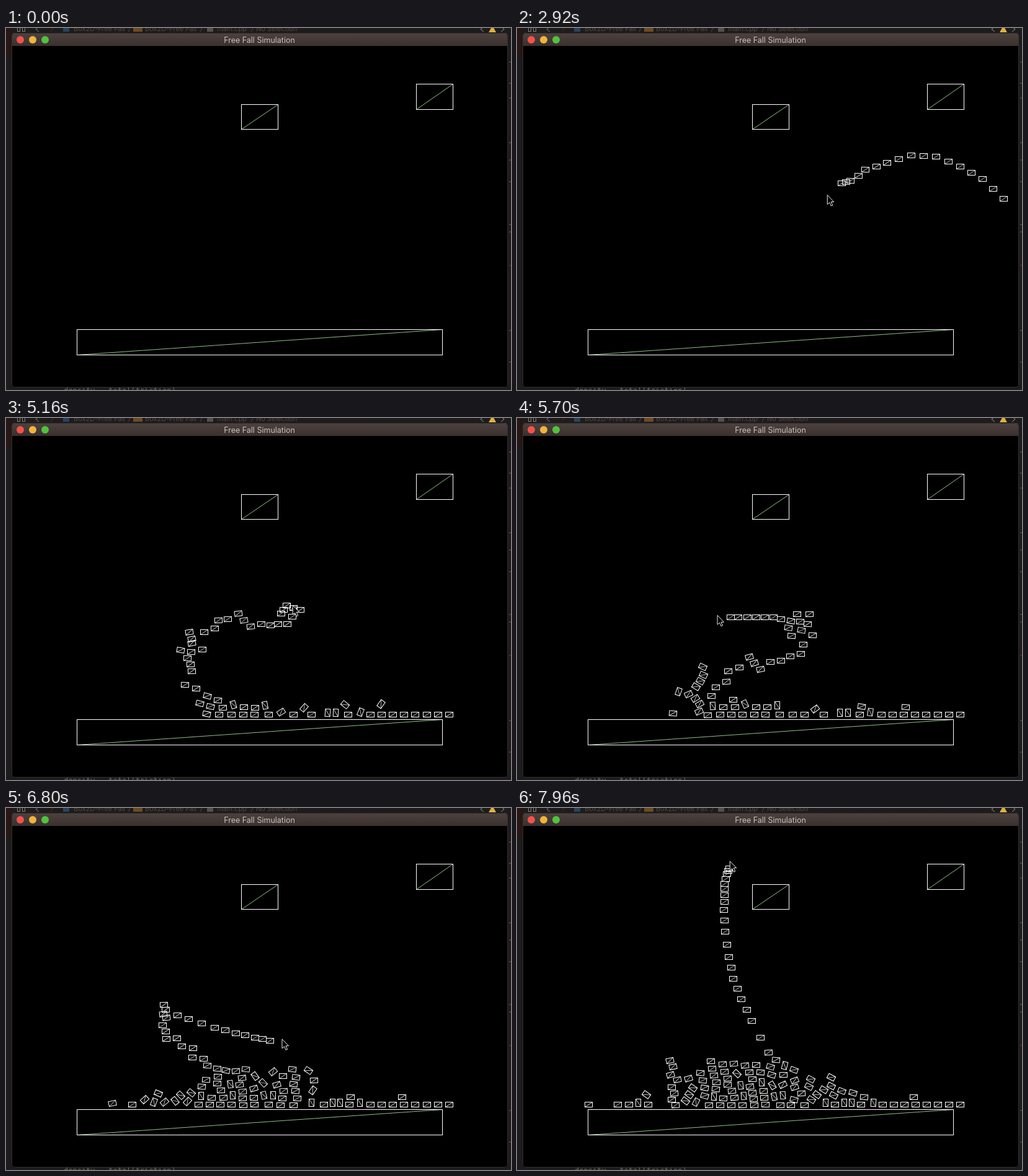
An HTML page with a canvas for the animation above (8000 ms loop, 814x584 px).

```html
<!DOCTYPE html>
<html lang="en">
<head>
<meta charset="utf-8">
<title>Free Fall Simulation</title>
<style>
html, body { margin: 0; width: 100%; height: 100%; overflow: hidden; background: #1d1b1b; }
canvas { display: block; width: 814px; height: 584px; }
</style>
</head>
<body>
<canvas id="stage" width="814" height="584"></canvas>
<script>
const LOOP = 8000, FIRST = 46, LAST = 171;
const GRAVITY = 0.38, SUBSTEPS = 4, H = 1 / SUBSTEPS;
const FRICTION = 0.2, BOUNCE = 0.15;
const ctx = document.getElementById('stage').getContext('2d');

// Pointer position every second tick, starting at FIRST.
const PATH = [
  784,226, 750,205, 714,195, 675,188, 635,192, 594,210, 563,227, 537,244,
  523,250, 494,280, 463,293, 436,297, 409,296, 387,295, 368,295, 352,292,
  338,289, 328,291, 316,294, 298,296, 296,284, 299,284, 298,296, 291,294,
  322,296, 345,290, 368,292, 397,312, 425,321, 450,323, 472,307, 453,302,
  443,315, 470,302, 438,320, 414,316, 386,319, 357,321, 330,321, 306,322,
  286,319, 263,317, 252,311, 254,299, 260,309, 292,327, 337,347, 370,360,
  400,369, 425,375, 453,376, 430,357, 405,320, 378,281, 361,258, 348,237,
  341,212, 335,180, 333,150, 334,132, 334,119, 338,106, 342,97, 345,86
];

function pointer(tick) {
  const u = (tick - FIRST) / 2;
  const i = Math.max(0, Math.min(PATH.length / 2 - 2, Math.floor(u)));
  const f = u - i, k = i * 2;
  return {
    x: PATH[k] + (PATH[k + 2] - PATH[k]) * f,
    y: PATH[k + 1] + (PATH[k + 3] - PATH[k + 1]) * f
  };
}

// ---- Rigid boxes ----
function makeBody(x, y, hw, hh, fixed) {
  return {
    x, y, hw, hh, a: 0, c: 1, s: 0, vx: 0, vy: 0, w: 0,
    r: Math.hypot(hw, hh),
    im: fixed ? 0 : 1,
    ii: fixed ? 0 : 1 / (hw * hw + hh * hh)
  };
}

function turn(b, da) {
  b.a += da;
  b.c = Math.cos(b.a);
  b.s = Math.sin(b.a);
}

const extent = (b, nx, ny) =>
  b.hw * Math.abs(b.c * nx + b.s * ny) + b.hh * Math.abs(b.c * ny - b.s * nx);

function inside(b, p) {
  const dx = p.x - b.x, dy = p.y - b.y;
  return Math.abs(b.c * dx + b.s * dy) <= b.hw + 0.02 &&
         Math.abs(b.c * dy - b.s * dx) <= b.hh + 0.02;
}

function corners(b) {
  return [[-1, -1], [1, -1], [1, 1], [-1, 1]].map(([i, j]) => ({
    x: b.x + b.c * b.hw * i - b.s * b.hh * j,
    y: b.y + b.s * b.hw * i + b.c * b.hh * j
  }));
}

function collide(a, b, out) {
  const dx = b.x - a.x, dy = b.y - a.y;
  let least = Infinity, nx = 0, ny = 0;
  for (const [ax, ay] of [[a.c, a.s], [-a.s, a.c], [b.c, b.s], [-b.s, b.c]]) {
    const d = dx * ax + dy * ay;
    const overlap = extent(a, ax, ay) + extent(b, ax, ay) - Math.abs(d);
    if (overlap <= 0) return;
    if (overlap < least - 0.01) {
      least = overlap;
      nx = d < 0 ? -ax : ax;
      ny = d < 0 ? -ay : ay;
    }
  }
  const topA = a.x * nx + a.y * ny + extent(a, nx, ny);
  const lowB = b.x * nx + b.y * ny - extent(b, nx, ny);
  const found = [];
  for (const p of corners(a))
    if (inside(b, p)) found.push({ p, depth: p.x * nx + p.y * ny - lowB });
  for (const p of corners(b))
    if (inside(a, p)) found.push({ p, depth: topA - p.x * nx - p.y * ny });
  if (!found.length) found.push({ p: { x: a.x + dx / 2, y: a.y + dy / 2 }, depth: least });

  for (const { p, depth } of found) {
    const k = {
      a, b, nx, ny, depth, share: 1 / found.length, pn: 0, pt: 0,
      ax: p.x - a.x, ay: p.y - a.y, bx: p.x - b.x, by: p.y - b.y
    };
    k.mn = effMass(k, nx, ny);
    k.mt = effMass(k, -ny, nx);
    const v = speed(k, nx, ny);
    k.bounce = v < -1.5 ? -BOUNCE * v : 0;
    out.push(k);
  }
}

function effMass(k, nx, ny) {
  const ra = k.ax * ny - k.ay * nx, rb = k.bx * ny - k.by * nx;
  return 1 / (k.a.im + k.b.im + k.a.ii * ra * ra + k.b.ii * rb * rb);
}

function speed(k, nx, ny) {
  const { a, b } = k;
  return (b.vx - b.w * k.by - a.vx + a.w * k.ay) * nx +
         (b.vy + b.w * k.bx - a.vy - a.w * k.ax) * ny;
}

function push(k, nx, ny, j) {
  const { a, b } = k;
  a.vx -= nx * j * a.im;
  a.vy -= ny * j * a.im;
  a.w -= (k.ax * ny - k.ay * nx) * j * a.ii;
  b.vx += nx * j * b.im;
  b.vy += ny * j * b.im;
  b.w += (k.bx * ny - k.by * nx) * j * b.ii;
}

function solve(k) {
  const { nx, ny } = k;
  const pn = Math.max(0, k.pn + (k.bounce - speed(k, nx, ny)) * k.mn);
  push(k, nx, ny, pn - k.pn);
  k.pn = pn;
  const limit = FRICTION * pn;
  const pt = Math.max(-limit, Math.min(limit, k.pt - speed(k, -ny, nx) * k.mt));
  push(k, -ny, nx, pt - k.pt);
  k.pt = pt;
}

// Slides overlapping boxes apart without turning them.
function separate(k) {
  const gap = Math.min(0.25, 0.12 * Math.max(0, k.depth - 0.2));
  const { a, b, nx, ny } = k, j = gap * k.share / (a.im + b.im);
  a.x -= nx * j * a.im;
  a.y -= ny * j * a.im;
  b.x += nx * j * b.im;
  b.y += ny * j * b.im;
}

function step(bodies, floor) {
  const contacts = [];
  for (const b of bodies) b.vy += GRAVITY * H;
  bodies.forEach((a, i) => {
    for (let j = i + 1; j < bodies.length; j++) {
      const b = bodies[j], reach = a.r + b.r;
      if (Math.abs(a.x - b.x) < reach && Math.abs(a.y - b.y) < reach) collide(a, b, contacts);
    }
    if (a.y > 465) collide(a, floor, contacts);
  });
  for (let n = 0; n < 8; n++) contacts.forEach(solve);
  for (const b of bodies) {
    b.x += b.vx * H;
    b.y += b.vy * H;
    b.w *= 0.99;
    turn(b, b.w * H);
  }
  contacts.forEach(separate);
}

// Poses of all boxes at every tick.
function simulate() {
  const poses = [], floor = makeBody(408.5, 504, 309.5, 20, true);
  let bodies = [];
  for (let n = FIRST; n <= LAST; n++) {
    const p = pointer(n);
    bodies = bodies.filter(b => b.y < 600);
    bodies.push(makeBody(p.x, p.y, 9, 6));
    poses[n] = bodies.map(({ x, y, a }) => ({ x, y, a }));
    for (let i = 0; i < SUBSTEPS; i++) step(bodies, floor);
  }
  return poses;
}

// Ticks come in bursts of three every 140 ms.
function tickAt(ms) {
  const t = ms - 80, burst = Math.floor(t / 140), rest = t - burst * 140;
  return burst * 3 + (rest < 20 ? 0 : rest < 40 ? 1 : 2);
}

// ---- Drawing ----
function rect(x, y, w, h, color) {
  ctx.fillStyle = color;
  ctx.fillRect(x, y, w, h);
}

function dot(x, y, r, color) {
  ctx.fillStyle = color;
  ctx.beginPath();
  ctx.arc(x, y, r, 0, 7);
  ctx.fill();
}

function line(color, ...pts) {
  ctx.strokeStyle = color;
  ctx.beginPath();
  for (let i = 0; i < pts.length; i += 2) ctx.lineTo(pts[i], pts[i + 1]);
  ctx.stroke();
}

function text(str, x, y, color, font) {
  ctx.fillStyle = color;
  ctx.font = font;
  ctx.fillText(str, x, y);
}

function drawBackdrop() {
  const dim = '#514641', small = '11px Inter, sans-serif';
  rect(0, 0, 814, 584, '#1d1b1b');
  rect(0, 0, 8, 46, '#2a1614');
  ctx.lineWidth = 1;
  ctx.strokeStyle = '#85807c';
  for (const x of [18.5, 26.5]) ctx.strokeRect(x, -0.5, 4, 6);
  line('#85807c', 53, -2, 48, 2, 53, 6);
  line('#552822', 71, 6, 76, 2, 71, -2);
  rect(92, 0, 10, 6, '#27445c');
  rect(205, 0, 15, 6, '#6d4a24');
  rect(324, 0, 10, 6, '#55504c');
  text('Box2D-Free Fall', 109, 5, dim, small);
  text('Box2D-Free Fall', 224, 5, dim, small);
  text('main.cpp', 340, 5, dim, small);
  text('No Selection', 403, 5, dim, small);
  for (const x of [197, 313, 395]) line(dim, x, 6, x + 4, -2);
  line('#98928e', 770, -2, 765, 2, 770, 6);
  line('#98928e', 798, -2, 803, 2, 798, 6);
  ctx.fillStyle = '#e0b040';
  ctx.beginPath();
  ctx.moveTo(784, -4);
  ctx.lineTo(790, 7);
  ctx.lineTo(778, 7);
  ctx.fill();
  for (const y of [54, 88, 112, 184, 212, 247, 316, 328, 487, 538]) rect(811, y, 3, 2, '#45403e');
  rect(811, 382, 3, 2, '#552822');
  text('density = total(friction)', 93, 589, '#736d69', '12px "DejaVu Sans Mono", monospace');
}

function drawWindow() {
  ctx.save();
  ctx.beginPath();
  ctx.roundRect(9, 8, 800, 572, 5);
  ctx.clip();
  rect(9, 8, 800, 572, '#000');
  const shade = ctx.createLinearGradient(0, 8, 0, 29);
  shade.addColorStop(0, '#4d423f');
  shade.addColorStop(1, '#3a302e');
  rect(9, 8, 800, 21, shade);
  rect(9, 8, 800, 1, '#675d59');
  ctx.restore();
  ctx.strokeStyle = '#343030';
  ctx.beginPath();
  ctx.roundRect(9.5, 8.5, 799, 571, 5);
  ctx.stroke();
  dot(23, 19, 6, '#f4524a');
  dot(43, 19, 6, '#f0b43c');
  dot(63, 19, 6, '#52c23e');
  ctx.textAlign = 'center';
  text('Free Fall Simulation', 408.5, 24, '#cac2be', '12.5px Inter, sans-serif');
  ctx.textAlign = 'left';
}

function drawBox(x, y, w, h, diagonal) {
  line(diagonal, x, y + h, x + w, y);
  ctx.strokeStyle = '#fff';
  ctx.strokeRect(x, y, w, h);
}

function drawPointer(x, y) {
  ctx.save();
  ctx.translate(x, y);
  ctx.beginPath();
  [[0, 0], [0, 15], [3.5, 12], [6, 17.5], [8.5, 16.5], [6, 11], [10.5, 11]]
    .forEach(p => ctx.lineTo(...p));
  ctx.closePath();
  ctx.fillStyle = '#000';
  ctx.fill();
  ctx.strokeStyle = '#ececec';
  ctx.stroke();
  ctx.restore();
}

const poses = simulate();

function draw(ms) {
  const tick = tickAt(ms), green = '#8cc084';
  drawBackdrop();
  drawWindow();
  drawBox(379.5, 123.5, 59, 40, green);
  drawBox(661.5, 90.5, 59, 41, green);
  drawBox(114.5, 486.5, 589, 41, green);

  ctx.save();
  ctx.beginPath();
  ctx.rect(10, 29, 798, 550);
  ctx.clip();
  for (const b of poses[tick] || []) {
    ctx.save();
    ctx.translate(Math.round(b.x) + 0.5, Math.round(b.y) + 0.5);
    ctx.rotate(b.a);
    drawBox(-6, -4, 12, 8, '#b8b8b0');
    ctx.restore();
  }
  ctx.restore();

  if (tick >= FIRST - 2) {
    const p = pointer(tick + 1.5);
    drawPointer(p.x - 1, p.y - 3);
  }
}

const start = performance.now();
function frame() {
  draw((performance.now() - start) % LOOP);
  requestAnimationFrame(frame);
}
frame();
</script>
</body>
</html>
```
